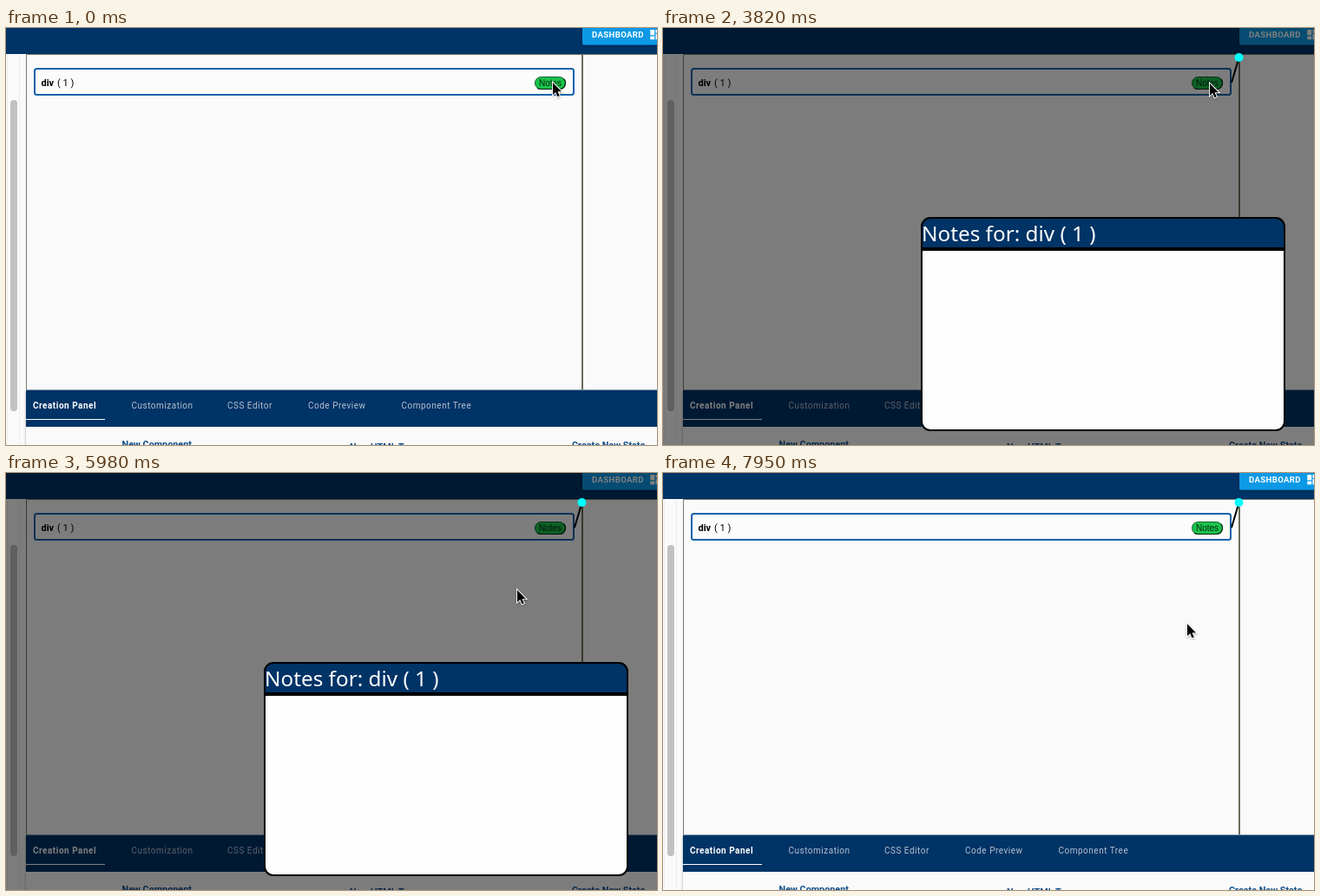
An HTML page that plays this animation: 750x481 px, repeating every 8 s.

```html
<!DOCTYPE html>
<html lang="en">
<head>
<meta charset="utf-8">
<title>Notes panel</title>
<style>
  html, body { margin: 0; width: 100%; height: 100%; overflow: hidden; background: #fafafa; }
  svg { display: block; width: 750px; height: 481px; }
  text { font-family: Roboto, sans-serif; white-space: pre; }
  .tabs text { font-size: 10px; letter-spacing: .5px; fill: #b3c2d1; }
  .tabs .active { fill: #fff; font-weight: 600; }
  .headings text { font-size: 10.8px; font-weight: 700; fill: #124e88; }
  .label { font-size: 11px; }
  .notes { font: 10px "Liberation Sans", Arial, sans-serif; fill: #06290f; }
  .title { font: 24.3px "Noto Sans", sans-serif; fill: #fff; }
</style>
</head>
<body>
<svg viewBox="0 0 750 481">
  <defs>
    <filter id="shadow" x="-10%" y="-40%" width="120%" height="180%">
      <feDropShadow dx="0" dy="1" stdDeviation="1.5" flood-opacity=".35"/>
    </filter>
    <filter id="cursorShadow" x="-50%" y="-30%" width="200%" height="170%">
      <feDropShadow dx="0" dy="1" stdDeviation=".8" flood-opacity=".35"/>
    </filter>
  </defs>

  <rect width="750" height="481" fill="#fafafa"/>
  <path d="M1.5 30V481M15.5 30V481" stroke="#ededed"/>
  <rect x="5" y="83" width="8" height="359" rx="4" fill="#c1c1c1"/>
  <path d="M23.5 417V30.5H750" fill="none" stroke="#77776a"/>
  <path d="M664 30V417" stroke="#6c6c5e" stroke-width="2"/>
  <rect width="750" height="30" fill="#003366"/>
  <rect x="664" y="-12" width="100" height="31.5" rx="2" fill="#0899e6" filter="url(#shadow)"/>
  <text x="675" y="11" font-size="9.6" font-weight="600" letter-spacing=".35" fill="#fff">DASHBOARD</text>
  <path transform="translate(740.4 .2) scale(.62)" fill="#fff"
    d="M3 13h8V3H3zM3 21h8v-6H3zM13 21h8V11h-8zM13 3v6h8V3z"/>

  <rect x="33" y="47" width="621" height="30" rx="2.5" fill="#fcfcfc" stroke="#1263ab" stroke-width="2"/>
  <text class="label" x="40.5" y="67" font-weight="700">div</text>
  <text class="label" x="59" y="67">( 1 )</text>
  <rect x="609.5" y="56.5" width="35" height="14" rx="7" fill="#19c34b" stroke="#16602c"/>
  <path id="bevel" fill="none" stroke="#07230f" stroke-width="1.2"/>
  <text class="notes" x="614" y="67">Notes</text>

  <rect x="23" y="418" width="740" height="80" fill="#fafafa" filter="url(#shadow)"/>
  <rect x="23" y="417.5" width="727" height="42.5" fill="#003366"/>
  <path d="M23 451.5H114" stroke="#fff"/>
  <g class="tabs">
    <text class="active" x="31" y="439">Creation Panel</text>
    <text x="144.5" y="439">Customization</text>
    <text x="255" y="439">CSS Editor</text>
    <text x="348" y="439">Code Preview</text>
    <text x="455.5" y="439">Component Tree</text>
  </g>
  <g class="headings">
    <text x="133.5" y="484">New Component</text>
    <text x="396" y="487">New HTML Tag</text>
    <text x="652" y="484.5">Create New State</text>
  </g>

  <rect id="dim" width="750" height="481" opacity=".5"/>
  <g id="link">
    <path d="M655 63L663 36" stroke="#000" stroke-width="2"/>
    <circle cx="663.5" cy="34" r="5" fill="#0ff"/>
  </g>
  <g id="modal">
    <rect x="298" y="219" width="418" height="245" rx="10" fill="#fefefe"/>
    <path d="M298 254V229A10 10 0 0 1 308 219H706A10 10 0 0 1 716 229V254Z" fill="#003366"/>
    <path d="M298 255H716" stroke="#000" stroke-width="4"/>
    <rect x="298" y="219" width="418" height="245" rx="10" fill="none" stroke="#000" stroke-width="2"/>
    <text class="title" x="298" y="246">Notes for: div ( 1 )</text>
  </g>
  <path id="cursor" d="M0 0V14L3.2 11L5.5 16.2L7.8 15.2L5.5 10.2H10Z" fill="#000"
    stroke="#fff" stroke-width="1.8" paint-order="stroke" filter="url(#cursorShadow)"/>
</svg>
<script>
  const LOOP = 8000, PRESS = 600, OPEN = 950, CLOSE = 7360;
  const RAISED = "M612 69.5Q614 70.5 617 70.5H637.5A7 7 0 0 0 642.5 58.6";
  const PRESSED = "M611.5 68.4A7 7 0 0 1 616.5 56.5H637Q640 56.5 642 57.5";
  const el = id => document.getElementById(id);
  const show = (id, on) => el(id).setAttribute("visibility", on ? "visible" : "hidden");
  const ease = p => p * p * (3 - 2 * p);

  // [start, last change, number of steps, from, to]
  const moves = [
    [3820, 3820, 1, [630, 63], [630, 64]],
    [5190, 5980, 15, [630, 64], [589, 135]],
    [7900, 7950, 2, [589, 135], [604, 174]]
  ];

  function cursorAt(t) {
    let point = moves[0][3];
    for (const [start, end, steps, from, to] of moves) {
      if (t < start) break;
      const gap = (end - start) / (steps - 1 || 1);
      const step = t >= end ? steps : Math.floor((t - start) / gap) + 1;
      const p = ease(step / steps);
      point = from.map((v, i) => v + (to[i] - v) * p);
    }
    return point;
  }

  function draw(now) {
    const t = now % LOOP;
    const open = t >= OPEN && t < CLOSE;
    show("dim", open);
    show("modal", open);
    show("link", t >= OPEN);
    el("bevel").setAttribute("d", t >= PRESS && t < OPEN ? PRESSED : RAISED);
    el("cursor").setAttribute("transform", `translate(${cursorAt(t)})`);
  }

  const begin = performance.now();
  function tick() {
    draw(performance.now() - begin);
    requestAnimationFrame(tick);
  }
  tick();
</script>
</body>
</html>
```
